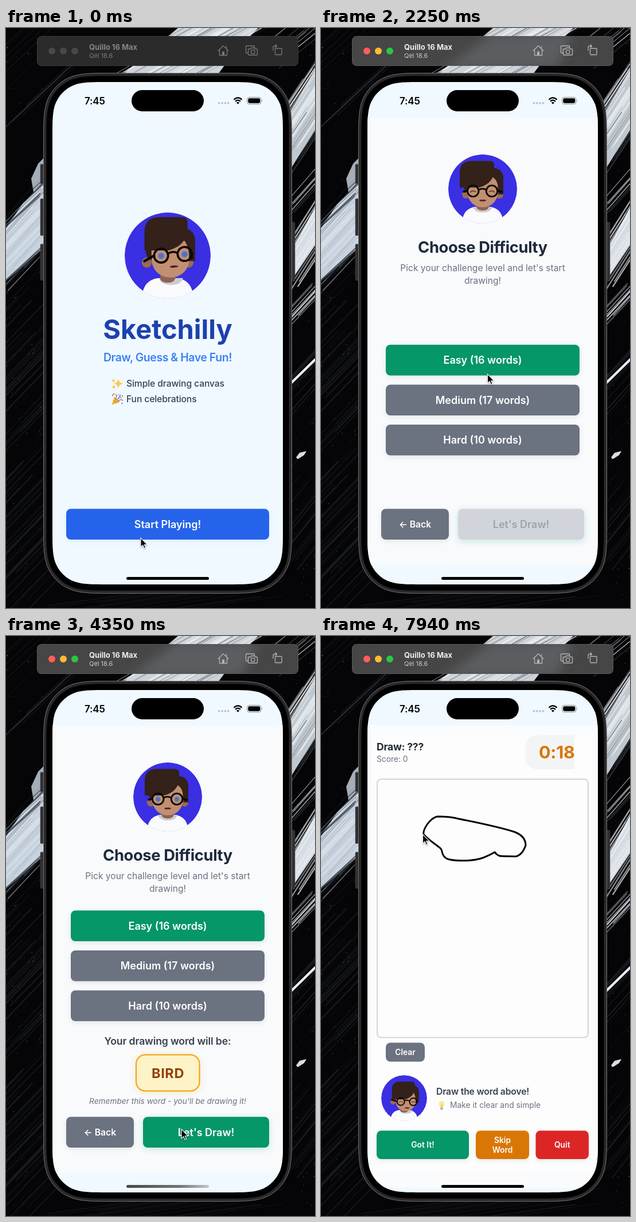
Recreate the animation shown at these times as an HTML page with a canvas. Size 539 px wide and 1009 px high, loop 8 s.

```html
<!DOCTYPE html>
<html lang="en">
<head>
<meta charset="utf-8">
<title>Drawing game</title>
<style>
  html, body { margin: 0; width: 539px; height: 1009px; overflow: hidden; background: #050507; }
  canvas, svg { position: absolute; left: 0; top: 0; display: block; }
  text { font-family: Inter, "Open Sans", sans-serif; white-space: pre; }
  .soft { filter: drop-shadow(0 3px 4px rgba(0, 0, 0, .08)); }
  .blue { filter: drop-shadow(0 3px 6px rgba(37, 99, 235, .08)); }
  .mint { filter: drop-shadow(0 3px 6px rgba(5, 150, 105, .2)); }
  .amber { filter: drop-shadow(0 2px 6px rgba(245, 158, 11, .22)); }
</style>
</head>
<body>
<canvas id="wall" width="539" height="1009"></canvas>
<svg id="stage" width="539" height="1009" viewBox="0 0 539 1009"></svg>
<script>
const LOOP = 8000;
const $ = id => document.getElementById(id);

// ---------- wallpaper ----------
function paintWall() {
  const c = $('wall').getContext('2d');
  let seed = 11;
  const rnd = () => (seed = seed * 16807 % 2147483647) / 2147483647;

  // parallel bristle lines around the axis a -> b
  function brush(x1, y1, x2, y2, spread, n, color, thick = 2, alpha = .8) {
    const dx = x2 - x1, dy = y2 - y1, len = Math.hypot(dx, dy);
    c.strokeStyle = color;
    for (let i = 0; i < n; i++) {
      const o = (rnd() - .5) * spread, a = rnd() * .35, b = 1 - rnd() * .35;
      const ox = -dy / len * o, oy = dx / len * o;
      c.globalAlpha = alpha * (.4 + rnd() * .6);
      c.lineWidth = .4 + rnd() * thick;
      c.beginPath();
      c.moveTo(x1 + dx * a + ox, y1 + dy * a + oy);
      c.lineTo(x1 + dx * b + ox + rnd() * 3, y1 + dy * b + oy);
      c.stroke();
    }
    c.globalAlpha = 1;
  }
  function patch(color, ...p) {
    c.fillStyle = color;
    c.beginPath();
    for (let i = 0; i < p.length; i += 2) c.lineTo(p[i], p[i + 1]);
    c.fill();
  }

  c.fillStyle = '#050507';
  c.fillRect(0, 0, 539, 1009);
  brush(-60, 160, 120, -10, 110, 14, '#4a5058', 1.2, .45);
  brush(-80, 700, 130, 480, 220, 46, '#39424c', 1.2, .45);
  brush(-80, 980, 130, 760, 220, 50, '#2b333c', 1.5, .5);
  brush(440, 950, 600, 750, 160, 24, '#3a4046', 1.1, .5);
  brush(440, 720, 600, 540, 100, 12, '#4a525a', 1.1, .45);
  brush(60, 1030, 500, 970, 50, 18, '#333a42', 1.1, .45);

  // left stroke
  patch('#c3cedb', 0, 348, 30, 304, 70, 264, 70, 380, 34, 412, 0, 440);
  patch('#a4aeb8', 44, 262, 56, 236, 70, 222, 70, 262, 48, 286);
  brush(-40, 440, 110, 280, 86, 40, '#dfe7ef', 2.4, .6);
  brush(-40, 440, 100, 280, 100, 12, '#6b7783', 1, .6);
  brush(-40, 482, 100, 352, 12, 10, '#0a0c0f', 2);
  brush(-30, 362, 90, 250, 18, 10, '#0a0c0f', 2);

  // top stroke
  patch('#ccd2d8', 300, 0, 440, 0, 400, 40, 370, 80, 205, 80, 240, 50);
  brush(190, 110, 450, -40, 66, 36, '#eef1f4', 2.4, .7);
  brush(200, 110, 470, -40, 90, 14, '#4d555d', 1.2);
  brush(440, 70, 560, -30, 60, 10, '#dfe5ea', 1.2);

  // right strokes
  patch('#bfc7cf', 496, 146, 539, 72, 539, 178, 496, 246);
  brush(470, 215, 570, 60, 60, 32, '#eef1f4', 2.4, .7);
  brush(470, 260, 570, 110, 50, 10, '#59626b', 1.5);
  patch('#d2dae2', 496, 392, 539, 312, 539, 378, 496, 442);
  brush(470, 460, 570, 300, 56, 28, '#eef1f4', 2.4, .7);
  brush(470, 340, 570, 225, 26, 8, '#cfd7de', 1.5);
  brush(470, 530, 570, 420, 24, 10, '#dde4ea', 1.8);
  patch('#e8edf1', 498, 614, 539, 574, 539, 580, 498, 620);
  patch('#d9dee3', 506, 747, 512, 739, 524, 736, 520, 743, 509, 750);

  c.fillStyle = '#aab3bb';
  for (let i = 0; i < 130; i++) {
    c.globalAlpha = .15 + rnd() * .5;
    const x = rnd() < .5 ? rnd() * 64 : 498 + rnd() * 41;
    c.fillRect(x, rnd() * 1009, .6 + rnd(), .6 + rnd());
  }
  c.globalAlpha = 1;
}

// ---------- drawing helpers ----------
const text = (x, y, s, size, weight, fill, more = '') =>
  `<text x="${x}" y="${y}" font-size="${size}" font-weight="${weight}" fill="${fill}" ${more}>${s}</text>`;
const mid = (x, y, s, size, weight, fill, more = '') =>
  text(x, y, s, size, weight, fill, 'text-anchor="middle" ' + more);
const rect = (x, y, w, h, r, fill, more = '') =>
  `<rect x="${x}" y="${y}" width="${w}" height="${h}" rx="${r}" fill="${fill}" ${more}/>`;
const circle = (x, y, r, fill, more = '') =>
  `<circle cx="${x}" cy="${y}" r="${r}" fill="${fill}" ${more}/>`;
const ellipse = (x, y, rx, ry, fill, more = '') =>
  `<ellipse cx="${x}" cy="${y}" rx="${rx}" ry="${ry}" fill="${fill}" ${more}/>`;
const path = (d, fill, more = '') => `<path d="${d}" fill="${fill}" ${more}/>`;
const line = (d, stroke, w, more = '') =>
  path(d, 'none', `stroke="${stroke}" stroke-width="${w}" stroke-linecap="round" stroke-linejoin="round" ${more}`);
const group = (id, body, more = '') => `<g id="${id}" ${more}>${body}</g>`;
const snug = em => `letter-spacing="${em}em"`;
const button = (x, y, w, h, fill, label, size, cls = 'soft') =>
  rect(x, y, w, h, 8, fill, `class="${cls}"`) +
  mid(x + w / 2, y + h / 2 + size * .36, label, size, 600, '#fff');

// rounded rectangle with continuous corners
function smoothRect(x, y, w, h, r) {
  const k = [[1.529, 0], [1.088, 0], [.868, 0], [.631, .075], [.373, .169],
             [.169, .373], [.075, .631], [0, .868], [0, 1.088], [0, 1.529]];
  const corner = (cx, cy, sx, sy, flip) => {
    const p = (flip ? [...k].reverse() : k).map(([a, b]) => `${cx + sx * a * r} ${cy + sy * b * r}`);
    return `${p[0]}C${p.slice(1).join(' ')}`;
  };
  return 'M' + corner(x + w, y, -1, 1) + 'L' + corner(x + w, y + h, -1, -1, true) +
    'L' + corner(x, y + h, 1, -1) + 'L' + corner(x, y, 1, 1, true) + 'Z';
}
const GLASS = smoothRect(81, 94, 402, 874, 62);
const star = (x, y, r, fill) =>
  path(`M${x} ${y - r}Q${x + r * .15} ${y - r * .15} ${x + r} ${y}Q${x + r * .15} ${y + r * .15} ${x} ${y + r}` +
    `Q${x - r * .15} ${y + r * .15} ${x - r} ${y}Q${x - r * .15} ${y - r * .15} ${x} ${y - r}Z`, fill);

// ---------- parts ----------
const toolbar = () => {
  const icons =
    line('M370 39.5L379 31 388 39.5M372.5 38V47.5H385.5V38M384.5 35V32', 'currentColor', 1.3) +
    rect(377, 41, 4, 6, 0, 'currentColor') +
    line('M422 43.5H419.5Q418.5 43.5 418.5 42.5V32.5Q418.5 31 420 31H432Q433.5 31 433.5 32.5V34', 'currentColor', 1.3) +
    line('M423 36.5H426.5L428 34.5H433.5L435 36.5H437.5Q438.5 36.5 438.5 37.5V46Q438.5 47 437.5 47H424Q422.5 47 422.5 46V37.5Q422.5 36.5 423 36.5Z', 'currentColor', 1.3) +
    circle(430.7, 41.4, 3.2, 'none', 'stroke="currentColor" stroke-width="1.3"') +
    rect(469.5, 35.5, 11.5, 11, 1, 'none', 'stroke="currentColor" stroke-width="1.3"') +
    line('M466 39V34Q466 31.5 468.5 31.5H472M470 29L472.5 31.5 470 34', 'currentColor', 1.3);
  const names = (a, b) => text(145, 38, 'Quillo 16 Max', 13, 700, a) + text(145, 52, 'Qel 18.6', 11, 400, b);
  const lights = cols => cols.map((f, i) => circle(80 + 20 * i, 40, 6, f)).join('');
  const box = (fill, more) => rect(54.5, 14.5, 455, 51, 7, fill, more);
  return group('idle', box('#2b2b2c', 'stroke="#3a3a3b"') + lights(['#48484a', '#48484a', '#48484a']) +
      names('#868687', '#7c7c7d') + `<g color="#777778">${icons}</g>`) +
    group('active', box('#464647') +
      `<g clip-path="url(#barClip)">${path('M300 10H440L410 70H215Z', '#5c5d60', 'filter="url(#blur)"')}</g>` +
      box('none', 'stroke="#59595b"') + lights(['#ff5f57', '#febc2e', '#28c840']) +
      names('#ededee', '#c9c9ca') + `<g color="#b4b4b5">${icons}</g>`);
};

const phone = () =>
  [[60, 237, 34], [60, 297, 64], [60, 376, 63], [498, 338, 101]]
    .map(([x, y, h]) => rect(x, y, 6, h, 1.5, '#303033', 'stroke="#47474a" stroke-width=".6"')).join('') +
  path(smoothRect(65.5, 78.5, 433, 905, 78), '#29292b', 'stroke="#737376"') +
  path(smoothRect(70.5, 83.5, 423, 895, 73), '#000', 'stroke="#111"') +
  path(GLASS, '#f0f9ff');

const status = () =>
  text(137, 132.5, '7:45', 17, 600, '#000', snug(-.01)) +
  rect(219, 108, 126, 37, 18.5, '#000') +
  [371.5, 377, 382.3, 387.6].map(x => circle(x, 130.7, 1.9, '#bdc4ca')).join('') +
  line('M397.5 124.5Q404.5 118.2 411.5 124.5', '#000', 2.4, 'style="stroke-linecap:butt"') +
  line('M400 127.6Q404.5 123.6 409 127.6', '#000', 2.3, 'style="stroke-linecap:butt"') +
  path('M404.5 132.5L401.8 129.8Q404.5 127.6 407.2 129.8Z', '#000') +
  rect(420.5, 120.5, 24.5, 12, 3.8, 'none', 'stroke="#8b9094"') +
  rect(422.3, 122.3, 21, 8.4, 2.4, '#000') +
  path('M446.4 124.5Q448 126.5 446.4 128.5Z', '#8b9094');

const popper =
  path('M184.5 655.5L189 642Q196 645 198 651Z', '#f4b62f') +
  line('M187.5 648L193 652M189 643.5L197 650', '#c9803a', 1.3) +
  line('M192 643Q194 640 191.5 637.5M197 648Q201 645 204 648', '#b268d8', 1.6) +
  line('M195 645Q199 643 199 638', '#3f8fe0', 1.6) +
  [[186, 639, '#e5534b'], [195.5, 638, '#f4b62f'], [203, 640, '#e5534b'], [202.5, 653, '#3f8fe0'], [188, 636.5, '#4cae6a'], [200.5, 643, '#4cae6a']]
    .map(([x, y, f]) => circle(x, y, 1.2, f)).join('');

const home = () =>
  mid(282, 541, 'Sketchilly', 47, 700, '#1e40af') +
  mid(282, 580, 'Draw, Guess &amp; Have Fun!', 19.4, 600, '#3b82f6', snug(-.021)) +
  star(196, 618.5, 8, '#f9cd4d') + star(187.5, 613.5, 4, '#f9cd4d') + star(188, 624.5, 4.3, '#f9cd4d') +
  text(210, 624, 'Simple drawing canvas', 15.7, 500, '#374151', snug(-.008)) + popper +
  text(210, 651, 'Fun celebrations', 15.7, 500, '#374151', snug(-.008)) +
  button(105, 836.5, 354, 53.5, '#2563eb', 'Start Playing!', 18, 'blue');

const choose = () =>
  rect(81, 155, 402, 779, 0, '#f8fafc') +
  mid(282, 391, 'Choose Difficulty', 27.3, 700, '#1e293b', snug(-.013)) +
  mid(282, 423, "Pick your challenge level and let's start", 15.6, 400, '#6b7280') +
  mid(282, 445, 'drawing!', 15.6, 400, '#6b7280') +
  group('levels',
    group('easy', button(113, 551, 338, 53.5, '#059669', 'Easy (16 words)', 18)) +
    button(113, 620.5, 338, 53.5, '#6b7280', 'Medium (17 words)', 18) +
    button(113, 690, 338, 53.5, '#6b7280', 'Hard (10 words)', 18)) +
  button(105, 836.5, 118, 53.5, '#6b7280', '← Back', 15.7) +
  group('locked', rect(239, 836.5, 220, 53.5, 8, '#d1d5db', 'class="mint"') +
    mid(349, 869.7, "Let's Draw!", 18, 600, '#9ca3af')) +
  group('ready', button(239, 836.5, 220, 53.5, '#059669', "Let's Draw!", 18, 'mint')) +
  group('word',
    mid(282, 711, 'Your drawing word will be:', 17.6, 600, '#374151', snug(-.008)) +
    rect(227, 728.5, 110.5, 63, 16, '#fef3c7', 'stroke="#f59e0b" stroke-width="2" class="amber"') +
    mid(282.5, 769, 'BIRD', 23.5, 700, '#92400e', 'letter-spacing=".6"') +
    mid(282, 814, "Remember this word - you'll be drawing it!", 13.7, 400, '#6b7280', 'font-style="italic"'));

const SKETCH = 'M180 346C188 355 198 361 208 369Q211 372 211 375C212 380 215 386 221 388' +
  'C235 392 265 392 282 386Q295 381 303 376C306 380 309 383 316 383L340 383.5C350 381 355 370 357 364' +
  'C357 352 348 345 338 341C310 332 270 324 240 318C226 314 212 314 203 314C190 317 177 336 179 347';

const draw = () =>
  rect(81, 155, 402, 805, 0, '#fafbfd') + rect(92, 172, 380, 762, 0, '#fdfdfd') +
  text(97, 199, 'Draw: ???', 17.5, 700, '#1f2937', snug(-.012)) +
  text(97, 219, 'Score: 0', 13.8, 400, '#6b7280') +
  path('M442 172H380Q356 172 356 196V208Q356 232 380 232H442Z', '#f3f4f6') +
  text(380, 213, '<tspan id="clock">0:20</tspan>', 30.5, 700, '#d97706', snug(-.01)) +
  rect(98, 249, 368, 449.5, 7, '#fdfdfd', 'stroke="#d1d5db" stroke-width="2"') +
  line(SKETCH, '#000', 3, 'id="ink"') +
  button(113, 707.5, 68, 33, '#6b7280', 'Clear', 13.8, '') +
  text(201, 798, 'Draw the word above!', 15.7, 600, '#374151', snug(-.01)) +
  circle(210.5, 814, 5.2, '#fbe7a0') + rect(208, 818, 5, 3, 0, '#f6d77c') +
  rect(208, 820.5, 5, 3.5, 1.2, '#a9b0b8') + line('M210.5 818V815', '#e0aa3c', 1) +
  text(225, 821, 'Make it clear and simple', 13.8, 400, '#6b7280') +
  button(97, 860.5, 161, 49.5, '#059669', 'Got It!', 13.8) +
  button(270, 860.5, 93, 49.5, '#d97706', '', 13.8) +
  mid(316.5, 882, 'Skip', 13.8, 600, '#fff') + mid(316.5, 899, 'Word', 13.8, 600, '#fff') +
  button(374.5, 860.5, 92.5, 49.5, '#dc2626', 'Quit', 13.8);

const HAIR = '#33211a', SKIN = '#c18f71', EAR = '#9c6a53';
const avatar = () => `<g clip-path="url(#disc)">` +
  circle(0, 0, 75, '#3a2fe2') +
  group('backHair', rect(-41, -45, 86, 60, 21, HAIR)) +
  ellipse(-36.5, 12, 8.5, 9, EAR) + ellipse(36.5, 12, 8.5, 9, EAR) +
  path('M-44 80V66Q-40 42 -16 39H16Q40 42 44 66V80Z', '#fafafd') +
  group('collar', path('M-21 39H21Q18 51 0 51T-21 39Z', '#cbccd2')) +
  path('M-13 30H13V41Q10 47 0 47T-13 41Z', '#8f6151') +
  group('face', path('M-33 6V-8Q-30 -30 0 -31Q30 -30 33 -8V6C33 28 17 40 0 40S-33 28 -33 6Z', SKIN)) +
  group('fringe', path('M-50 -3V-35Q-50 -61 -24 -61H16Q25 -61 25 -52V-40Q24 -12 -8 -3Z', HAIR) +
    path('M22 -45Q45 -45 45 -22V12H34Q37 -18 18 -32Z', HAIR)) +
  group('features',
    group('open', circle(-21, 5, 5.2, '#4c74cc') + circle(20, 5, 5.2, '#4c74cc')) +
    group('shut', line('M-27 7Q-21 2 -15 6M14 6Q20 2 26 7', '#6b3327', 2)) +
    group('calm', ellipse(0, 25, 7.5, 2, '#5a1f1c')) +
    group('grin', path('M-10 18H11Q10 30 1 30T-10 18Z', '#5a1f1c') + path('M-9.5 18H10.5L9.5 22.5H-8Z', '#fff')) +
    [-21, 20].map(x => circle(x, 4.5, 12.2, 'none', 'stroke="#0a0808" stroke-width="3.6"')).join('') +
    line('M-9 2Q-.5 -3 8 2', '#0a0808', 3.6) + line('', '#0a0808', 4.6, 'id="arms"')) + '</g>';

// ---------- build ----------
$('stage').innerHTML = `<defs>
  <clipPath id="disc"><circle r="75"/></clipPath>
  <clipPath id="glass"><path d="${GLASS}"/></clipPath>
  <clipPath id="barClip"><rect x="54" y="14" width="456" height="52" rx="7"/></clipPath>
  <filter id="blur" x="-30%" y="-60%" width="160%" height="220%"><feGaussianBlur stdDeviation="9"/></filter>
  <linearGradient id="fade"><stop stop-color="#454a48"/><stop offset=".65" stop-color="#737675"/><stop offset="1" stop-color="#c4c6c5"/></linearGradient>
  </defs>` +
  toolbar() + phone() +
  `<g clip-path="url(#glass)">${group('home', home()) + group('choose', choose()) + group('draw', draw())}</g>` +
  status() +
  rect(210, 955, 144, 5, 2.5, '#000', 'id="grip"') + group('avatar', avatar()) +
  group('cursor', path('M0 0V16L3.7 12.6 6.2 18.3 8.7 17.2 6.3 11.7H11.3Z', '#000',
    'stroke="#fff" stroke-width="1.1" style="filter:drop-shadow(0 1px 1px rgba(0,0,0,.35))"'));
paintWall();

// ---------- motion ----------
const HEAD = [[0, 9.5, -6, -4], [300, 9.5, -6, -4], [900, -12, -1, 0], [1649, -12, -1, 0], [1650, 0, 0, 0],
  [3150, 0, 0, 0], [3450, -3, 0, 0], [3900, 0, 0, 0], [4650, 0, 0, 0], [5250, 9.5, -6, -4],
  [5549, 9.5, -6, -4], [5550, 0, 0, 0], [7040, 0, 0, 0], [7640, 10, 7, 1], [LOOP, 10, 7, 1]];
const HAND = [[0, 235, 887], [150, 235, 887], [1050, 239, 853], [1500, 239, 851], [1800, 239, 851], [2250, 290.5, 602],
  [2550, 292, 573], [3000, 290, 572], [3150, 288.5, 571], [3900, 306, 858], [4650, 306, 858],
  [5400, 258.5, 406], [5850, 178.5, 344], [6000, 178.5, 344]];
const BLINKS = [[600, 750], [2250, 2400], [2700, 2850], [4050, 4200], [5250, 5550], [6150, 6300], [7190, 7340], [7940, LOOP]];
const ink = $('ink'), INK = ink.getTotalLength();
const INKED = [[0, 0], [6000, 0], [6590, 123], [7940, INK]];

function track(keys, t) {
  const i = keys.findIndex(k => k[0] > t);
  if (i < 0) return keys[keys.length - 1].slice(1);
  const a = keys[i - 1], b = keys[i], p = (t - a[0]) / (b[0] - a[0]);
  return a.slice(1).map((v, j) => v + (b[j + 1] - v) * p);
}
const show = (id, on) => { $(id).style.display = on ? '' : 'none'; };
const move = (id, x, y, more = '') => $(id).setAttribute('transform', `translate(${x} ${y})${more}`);

function pose(t) {
  const screen = t < 1650 ? 'home' : t < 5550 ? 'choose' : 'draw';
  for (const s of ['home', 'choose', 'draw']) show(s, s === screen);
  show('idle', t < 1200);
  show('active', t >= 1200);

  const picked = t >= 3000;
  show('word', picked);
  show('ready', picked);
  show('locked', !picked);
  move('levels', 0, picked ? -73.5 : 0);
  $('easy').setAttribute('opacity', t === 2850 ? .8 : 1);
  $('ready').setAttribute('opacity', t === 4650 ? .8 : 1);
  $('grip').setAttribute('fill', picked && screen === 'choose' ? 'url(#fade)' : '#000');
  $('clock').textContent = t < 6450 ? '0:20' : t < 7490 ? '0:19' : '0:18';

  const [ax, ay, as] = { home: [282, 396, 1], choose: [282, 280, .8], draw: [145, 804, 8 / 15] }[screen];
  move('avatar', ax, ay, ` scale(${as})`);
  const [dx, dy, turn] = track(HEAD, t);
  move('backHair', dx * .3, dy * .4);
  move('collar', dx * .6, 0);
  move('face', dx * .5, dy * .3);
  move('fringe', dx, dy);
  // the far lobe of hair turns less than the fringe
  $('fringe').lastElementChild.setAttribute('transform', `translate(${-dx * .7} ${-dy * .6})`);
  move('features', dx, dy, ` rotate(${turn} 0 4)`);
  $('arms').setAttribute('d', `M-34 4L${-41 - dx} ${6 - dy}M33 4L${41 - dx} ${6 - dy}`);
  const blink = BLINKS.some(([a, b]) => t >= a && t < b), happy = t >= 4950 && t < 5550;
  show('shut', blink);
  show('open', !blink);
  show('grin', happy);
  show('calm', !happy);

  const [len] = track(INKED, t);
  ink.style.visibility = len > 0 ? '' : 'hidden';
  ink.setAttribute('stroke-dasharray', `${len} ${INK + 9}`);
  if (t > 6000) {
    const p = ink.getPointAtLength(Math.min(INK, len + 16));
    move('cursor', p.x - 1.5, p.y - 2);
  } else {
    move('cursor', ...track(HAND, t));
  }
}

// each picture holds for 150 ms, with one hold 10 ms shorter
const hold = t => t < 6590 ? Math.floor(t / 150) * 150 : Math.floor((t + 10) / 150) * 150 - 10;
const start = performance.now();
function tick() {
  pose(hold((performance.now() - start) % LOOP));
  requestAnimationFrame(tick);
}
tick();
</script>
</body>
</html>
```
